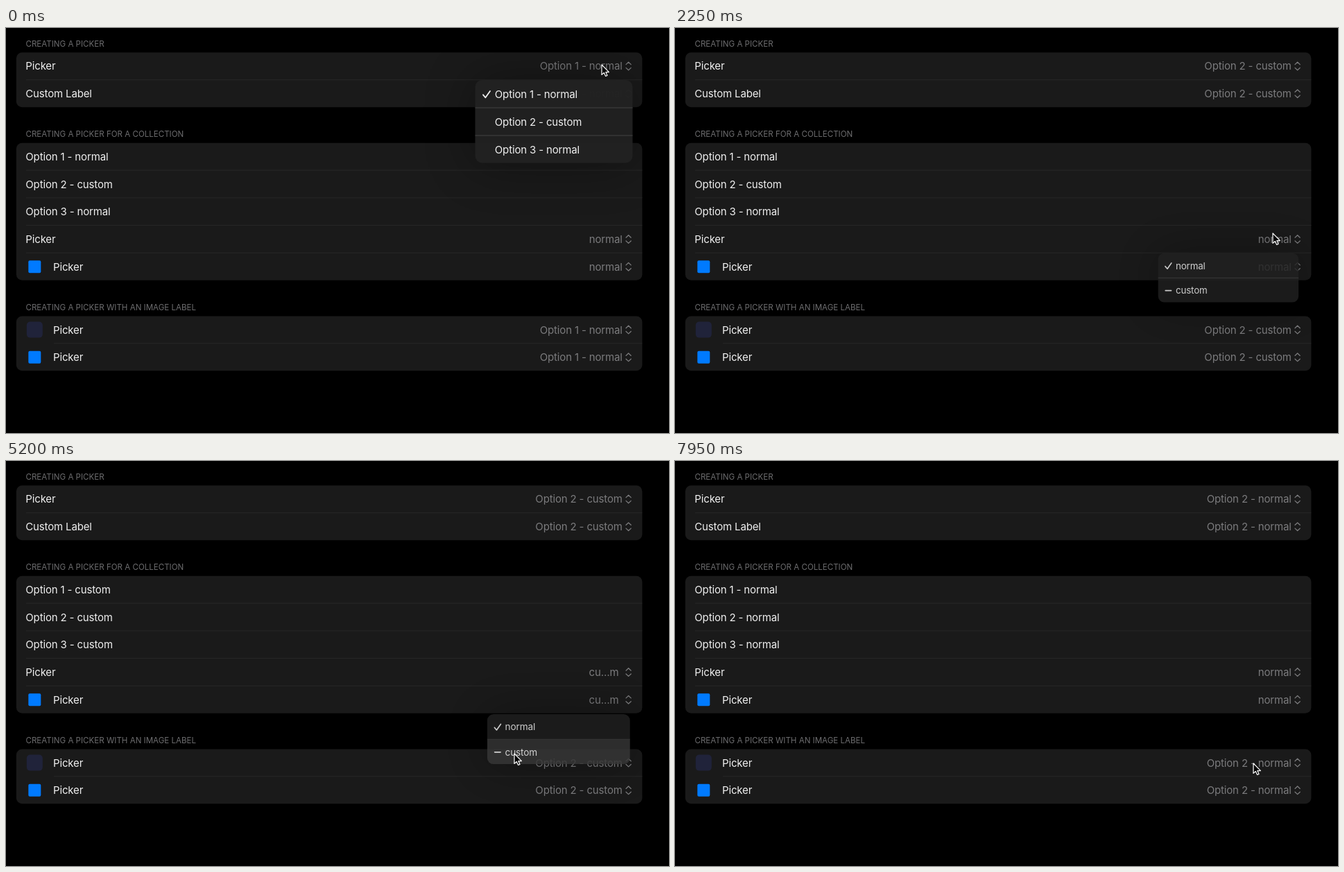
Animation of 956 by 584 pixels, one loop 8000 ms. Source, as an HTML page:

```html
<!DOCTYPE html>
<html lang="en">
<head>
<meta charset="utf-8">
<title>Pickers</title>
<style>
  html, body { margin: 0; width: 100%; height: 100%; overflow: hidden; background: #000; }
  svg { display: block; width: 956px; height: 584px; }
  text { font: 15px Inter, "Open Sans", sans-serif; letter-spacing: -.15px; fill: #f0f0f0; white-space: pre; }
  .heading { font-size: 11.55px; letter-spacing: 0; fill: #6d6d6f; }
  .value { fill: #7b7b7d; text-anchor: end; }
  .card { fill: #1a1a1a; }
  .rule { stroke: #2a2a2a; stroke-width: .9; }
  .chevrons { fill: none; stroke: #7b7b7d; stroke-width: 1.3; stroke-linecap: round; stroke-linejoin: round; }
  .shadow { fill: #000; opacity: .38; filter: url(#soft); }
  .panel { fill: #222; fill-opacity: .97; }
  .hover { fill: #363636; }
  .split { stroke: #424242; }
  .mark { fill: none; stroke: #f0f0f0; stroke-width: 1.8; stroke-linecap: round; stroke-linejoin: round; }
  .pointer { fill: #000; stroke: #fff; stroke-width: 1.2; stroke-linejoin: round; }
</style>
</head>
<body>
<svg id="stage" viewBox="0 0 956 584">
  <defs>
    <filter id="soft" x="-100%" y="-200%" width="300%" height="500%"><feGaussianBlur stdDeviation="36"/></filter>
  </defs>
</svg>
<script>
const LOOP = 8000, OPEN_MS = 110, CLOSE_MS = 350;
const MENU = { x: 676.5, width: 227, pitch: 40, pivot: 863 };
const stage = document.getElementById('stage');

function add(parent, tag, attrs, content) {
  const el = document.createElementNS('http://www.w3.org/2000/svg', tag);
  for (const key in attrs) el.setAttribute(key, attrs[key]);
  if (content) el.textContent = content;
  parent.append(el);
  return el;
}
const label = (x, mid, content, cls = '', parent = stage) =>
  add(parent, 'text', { x, y: mid + 5.4, class: cls }, content);

// Text that switches at given times: [[start, content, right edge], ...]
const switching = [];
const switchText = (el, steps) => switching.push({ el, steps });

const optionValue = [[0, 'Option 1 - normal'], [930, 'Option 2 - custom'], [7450, 'Option 2 - normal']];
const kindValue = [[0, 'normal'], [5080, 'cu…m', 883.5], [5650, 'custom'], [7450, 'normal']];
const listTitle = (n, customFrom) => customFrom
  ? [[0, `Option ${n} - normal`], [customFrom, `Option ${n} - custom`], [7450, `Option ${n} - normal`]]
  : [[0, `Option ${n} - custom`], [7450, `Option ${n} - normal`]];

const sections = [
  { mid: 55, title: 'CREATING A PICKER', rows: [
    { title: 'Picker', value: optionValue },
    { title: 'Custom Label', value: optionValue }] },
  { mid: 185.4, title: 'CREATING A PICKER FOR A COLLECTION', rows: [
    { title: listTitle(1, 5080) },
    { title: listTitle(2) },
    { title: listTitle(3, 5080) },
    { title: 'Picker', value: kindValue },
    { title: 'Picker', value: kindValue, icon: 'blue' }] },
  { mid: 435.1, title: 'CREATING A PICKER WITH AN IMAGE LABEL', rows: [
    { title: 'Picker', value: optionValue, icon: 'image' },
    { title: 'Picker', value: optionValue, icon: 'blue' }] },
];

function drawIcon(kind, mid) {
  const [size, rx, fill] = kind === 'blue' ? [18, 2, '#007aff'] : [23, 5, '#20233a'];
  add(stage, 'rect', { x: 41.3 - size / 2, y: mid - size / 2, width: size, height: size, rx, fill });
}

function drawSection({ mid, title, rows }) {
  const pitch = 39.72;
  add(stage, 'text', { x: 28.5, y: mid - 28.4, class: 'heading' }, title);
  add(stage, 'rect', { x: 14.8, y: mid - 19.7, width: 902.6, height: rows.length * pitch - .5, rx: 8.5, class: 'card' });
  rows.forEach((row, i) => {
    const y = mid + i * pitch;
    if (i) add(stage, 'line', { x1: rows[i - 1].icon ? 69 : 29, x2: 917.4, y1: y - 20, y2: y - 20, class: 'rule' });
    if (row.icon) drawIcon(row.icon, y);
    const name = label(row.icon ? 68 : 28.3, y, typeof row.title === 'string' ? row.title : '');
    if (Array.isArray(row.title)) switchText(name, row.title);
    if (row.value) {
      switchText(label(888.8, y, '', 'value'), row.value);
      add(stage, 'path', { d: `M894 ${y - 2.4}l3.6 -3.4l3.6 3.4m-7.2 4.8l3.6 3.4l3.6 -3.4`, class: 'chevrons' });
    }
  });
}
sections.forEach(drawSection);

const marks = {
  check: y => `M688 ${y + .8}l3.4 4l6.6 -9.4`,
  dash: y => `M688.3 ${y}h9.4`,
};
const menus = [
  { top: 75, open: -400, close: 930, press: 850, picked: 1,
    items: [['Option 1 - normal', 'check'], ['Option 2 - custom'], ['Option 3 - normal']] },
  { top: 324.7, open: 2200, close: 3287,
    items: [['normal', 'check'], ['custom', 'dash']] },
  { top: 365, open: 4235, close: 5080, press: 4900, picked: 1,
    items: [['normal', 'check'], ['custom', 'dash']] },
  { top: 324.7, open: 6650, close: 7450, press: 7350, picked: 0,
    items: [['normal'], ['custom', 'check']] },
];

function drawMenu(menu, id) {
  const { x, width, pitch } = MENU, { top, items } = menu;
  const box = { x, y: top, width, height: items.length * pitch - .5, rx: 10 };
  const g = menu.el = add(stage, 'g', {});
  add(add(stage.querySelector('defs'), 'clipPath', { id: 'menu' + id }), 'rect', box);
  add(g, 'rect', { ...box, class: 'shadow' });
  add(g, 'rect', { ...box, class: 'panel' });
  if (menu.press) {
    const inside = add(g, 'g', { 'clip-path': `url(#menu${id})` });
    menu.hover = add(inside, 'rect', { x, y: top + menu.picked * pitch, width, height: pitch, class: 'hover' });
  }
  items.forEach(([content, mark], i) => {
    const mid = top + 20.5 + i * pitch;
    if (i) add(g, 'line', { x1: x, x2: x + width, y1: mid - 20.5, y2: mid - 20.5, class: 'split' });
    if (mark) add(g, 'path', { d: marks[mark](mid), class: 'mark' });
    label(704.8, mid, content, '', g);
  });
}
menus.forEach(drawMenu);

const pointer = add(stage, 'path', { d: 'M0 0V14.4L3.3 11.4L5.6 16.5L8 15.4L5.8 10.6H10.4Z', class: 'pointer' });
// time, x, y of the pointer tip
const route = [
  [0, 859, 53], [100, 859, 53], [750, 735, 129], [930, 735, 129], [1300, 806, 195],
  [1900, 862, 296], [2450, 862, 296], [3100, 705.8, 325], [3500, 705.8, 325],
  [3950, 903, 358], [4200, 859.7, 353], [4400, 859.7, 353], [4750, 733, 422], [5650, 733, 422],
  [6450, 860, 319], [6950, 860, 319], [7300, 735, 338], [7480, 735, 338], [7950, 834, 436], [LOOP, 834, 436],
];

const clamp = v => Math.min(1, Math.max(0, v));
const smooth = v => v * v * (3 - 2 * v);

function pointerAt(t) {
  const i = route.findIndex(p => p[0] > t);
  const [t0, x0, y0] = route[i - 1], [t1, x1, y1] = route[i];
  const k = smooth((t - t0) / (t1 - t0));
  return [x0 + (x1 - x0) * k, y0 + (y1 - y0) * k];
}

function poseMenu({ el, hover, top, open, close, press }, t) {
  const shown = t >= open && t < close + CLOSE_MS;
  el.style.display = shown ? '' : 'none';
  if (!shown) return;
  const rise = 1 - (1 - clamp((t - open) / OPEN_MS)) ** 3;
  const fall = clamp((t - close) / CLOSE_MS);
  const scale = (.3 + .7 * rise) * (1 - .27 * fall);
  el.setAttribute('transform',
    `translate(${MENU.pivot} ${top}) scale(${scale}) translate(${-MENU.pivot} ${-top})`);
  el.setAttribute('opacity', rise * (1 - fall ** 1.8));
  if (hover) hover.style.display = t >= press ? '' : 'none';
}

function render(t) {
  for (const { el, steps } of switching) {
    const [, content, right] = steps.filter(s => s[0] <= t).pop();
    if (el.textContent !== content) el.textContent = content;
    if (el.classList.contains('value')) el.setAttribute('x', right || 888.8);
  }
  menus.forEach(menu => poseMenu(menu, t));
  pointer.setAttribute('transform', `translate(${pointerAt(t)})`);
}

const start = performance.now();
function tick() {
  render((performance.now() - start) % LOOP);
  requestAnimationFrame(tick);
}
tick();
</script>
</body>
</html>
```
